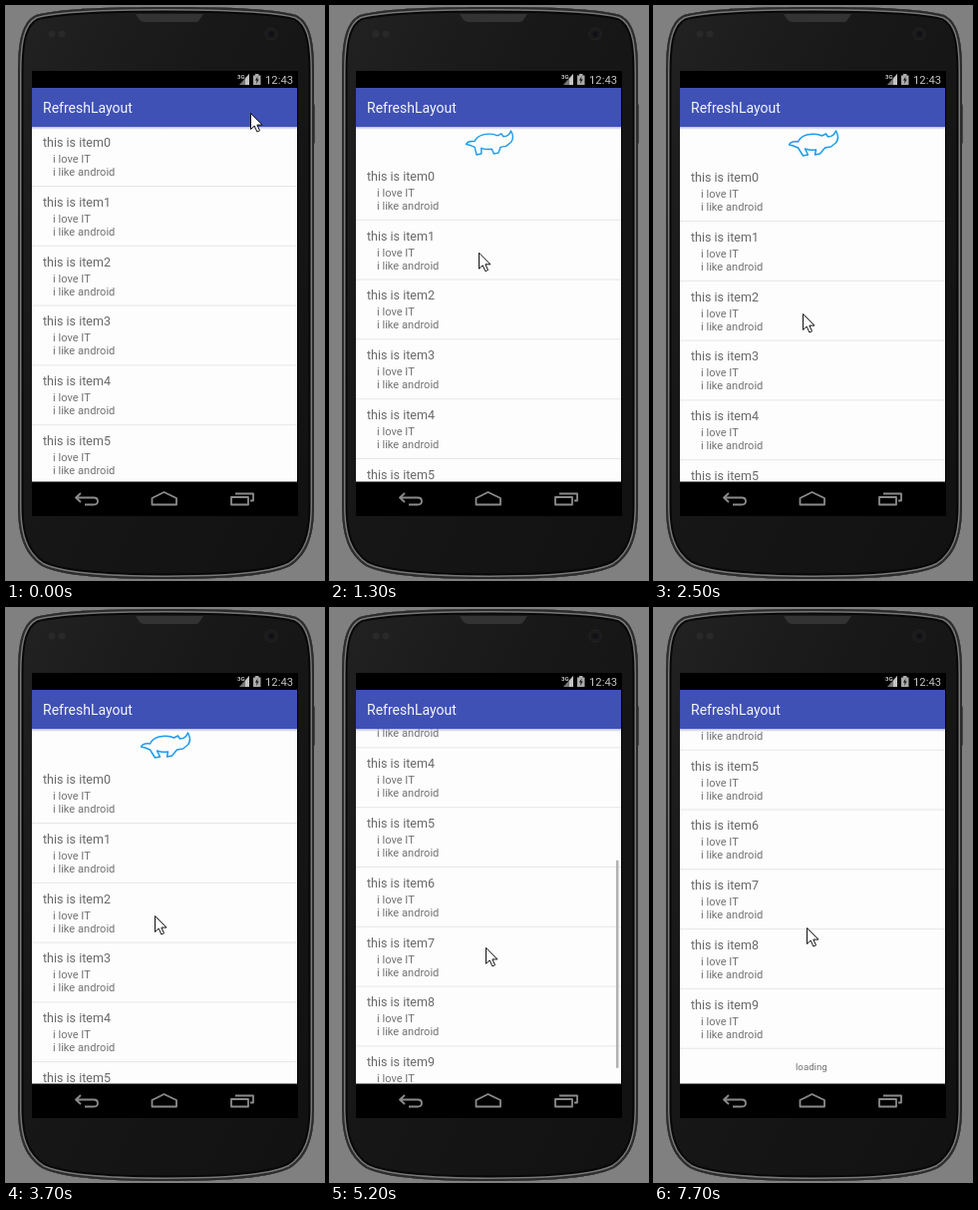
An HTML page that plays this animation: 319x575 px, repeating every 8 s.

```html
<!DOCTYPE html>
<html lang="en">
<head>
<meta charset="utf-8">
<title>RefreshLayout</title>
<style>
  html, body { margin: 0; width: 100%; height: 100%; overflow: hidden; background: #808080; }
  svg { display: block; width: 100vw; height: 100vh; font-family: Roboto, sans-serif; }
</style>
</head>
<body>
<svg viewBox="0 0 319 575">
  <defs>
    <linearGradient id="shell" x2="1" y2="1">
      <stop offset="0" stop-color="#222"/>
      <stop offset=".35" stop-color="#181818"/>
      <stop offset="1" stop-color="#111"/>
    </linearGradient>
    <linearGradient id="shade" x2="0" y2="1">
      <stop offset="0" stop-color="#7986cb" stop-opacity=".6"/>
      <stop offset="1" stop-color="#9fa8da" stop-opacity="0"/>
    </linearGradient>
    <path id="body" d="M12 66C12 34 16 16 30 9C56 2 108 1 160.500 1S265 2 291 9C305 16 309 34 309 66V500C309 530 303 549 285 561C263 572 211 574 160.500 574S58 572 36 561C18 549 12 530 12 500Z"/>
    <clipPath id="inside"><use href="#body"/></clipPath>
    <clipPath id="view"><rect x="26" y="121" width="266" height="355.500"/></clipPath>
  </defs>

  <rect width="319" height="575" fill="#808080"/>
  <rect x="306" y="98" width="4" height="40" rx="1.500" fill="#444"/>
  <g clip-path="url(#inside)">
    <use href="#body" fill="url(#shell)" stroke="#070707" stroke-width="11"/>
    <use href="#body" fill="none" stroke="#777" stroke-width="7"/>
    <use href="#body" fill="none" stroke="#2b2b2b" stroke-width="4"/>
  </g>
  <path d="M130 8H198L194 14Q193 16 190 16H139Q136 16 134 14Z" fill="#333"/>
  <circle cx="266" cy="28" r="6" fill="#1a1a1a" stroke="#252525"/>
  <circle cx="266" cy="28" r="2.500" fill="#101018"/>
  <g fill="#292929"><circle cx="46" cy="28" r="3.500"/><circle cx="56" cy="28" r="3.500"/></g>

  <rect x="26" y="65" width="267" height="446" fill="#000"/>
  <g fill="#c4c4c4">
    <text x="232" y="73" font-size="6" font-weight="700">3G</text>
    <path d="M234 79L244 68V79Z" fill="#777"/><path d="M240 79V72.500L244 68V79Z"/>
    <path d="M248 69.500H250V68H253.500V69.500H255.500V79H248Z" fill="#aaa"/>
    <path d="M252.500 70.500L250 74.500H251.700L251 78L253.700 73.500H252Z" fill="#111"/>
    <text x="260" y="77.500" font-size="11.300">12:43</text>
  </g>

  <rect x="26" y="121" width="266" height="355.500" fill="#fdfdfd"/>
  <g clip-path="url(#view)">
    <g id="list"></g>
    <path id="rhino" fill="none" stroke="#1d9bee" stroke-width="1.500" stroke-linejoin="round"/>
    <rect id="bar" x="287" width="2.500" height="208" fill="#b2b2b5"/>
    <rect x="26" y="121" width="266" height="3" fill="url(#shade)"/>
  </g>
  <rect x="26" y="82" width="266" height="39" fill="#3f51b5"/>
  <text x="37" y="107" font-size="14" fill="#f4f5fb">RefreshLayout</text>

  <g fill="none" stroke="#8b8b8b" stroke-width="1.800" stroke-linejoin="round">
    <path d="M75 488L70 492.500L75 497M70 492.500H88Q92 492.500 92 496T88 499.500H79"/>
    <path d="M146.500 493L158.500 487L171 493V499.500H146.500Z"/>
    <path d="M226 492H243V499.500H226ZM230 488.500H248V495.500H245"/>
  </g>
  <path id="cursor" d="M0 0V16L3.700 12.600L6.400 18.500L9 17.300L6.400 11.600H11.500Z" fill="#fff" stroke="#111"/>
</svg>
<script>
const LOOP = 8000, STEP = 100;
const TOP = 121, ROW = 59.8, COUNT = 10, VIEW = 355.5, HEADER = 35;
const END = COUNT * ROW - VIEW;
const $ = id => document.getElementById(id);

const ramp = (t, from, to) => Math.max(0, Math.min(1, (t - from) / (to - from)));
const easeOut = p => 1 - (1 - p) ** 2;

const label = (x, y, size, text, fill = '#727272') =>
  `<text x="${x}" y="${y}" font-size="${size}" fill="${fill}">${text}</text>`;

function row(i) {
  const y = TOP + i * ROW;
  return label(37, y + 20, 12.5, 'this is item' + i, '#696969') +
    label(47, y + 36, 11.1, 'i love IT') +
    label(47, y + 49, 11.1, 'i like android') +
    `<rect x="26" y="${y + ROW - 0.8}" width="266" height="1" fill="#e6e6e6"/>`;
}

$('list').innerHTML = Array.from({ length: COUNT }, (_, i) => row(i)).join('') +
  label(142, TOP + COUNT * ROW + 21, 9.7, 'loading');

// Stride runs from -1 to 1 and swings the legs.
function rhinoPath(stride) {
  const s = stride * 3;
  return `M-24-17Q-22-21-15-20Q-13-25-6-27Q3-29 9-26L13-28L15-25Q21-25 23-31Q27-24 23-19L18-15L12-14` +
    `L${10 - s}-8L${5 - s}-7L3-12Q-3-11-8-13L${-8 + s}-7L${-13 + s}-6L-15-14L-20-16Z`;
}

function pointer(t, drag) {
  const x = 245.5 - 96 * ramp(t, 0, 540) + 7 * ramp(t, 3800, 4900)
    - 6 * ramp(t, 5200, 6500) + 3 * ramp(t, 6500, 7700);
  const y = 107 + 35 * ramp(t, 0, 540) + drag + 92 * ramp(t, 3800, 4350)
    - 150 * ramp(t, 4350, 4900) + 120 * ramp(t, 4900, 5050)
    - 161 * ramp(t, 5050, 5850) + 172 * ramp(t, 5850, 6500) - 61 * ramp(t, 6500, 7400);
  return `translate(${x} ${y + 0.5})`;
}

function draw(t) {
  // The pull resists more the further it is dragged, then rests at the header height.
  const drag = 166 * ramp(t, 540, 1745);
  const stretch = 2.35 * drag ** 0.573;
  const held = stretch + (HEADER - stretch) * easeOut(ramp(t, 2000, 2400));
  const pull = held * (1 - easeOut(ramp(t, 3800, 4200)));
  const scroll = END * easeOut(ramp(t, 4400, 5550)) + HEADER * ramp(t, 6500, 7400);

  $('cursor').setAttribute('transform', pointer(t, drag));
  $('list').setAttribute('transform', `translate(0 ${pull - scroll})`);

  const stride = t < 2100 ? 0 : Math.sin(Math.floor((t + 50) / 150) * Math.PI / 2);
  const size = ramp(pull, 5.5, HEADER);
  $('rhino').setAttribute('d', rhinoPath(stride));
  $('rhino').setAttribute('transform', `translate(159.5 ${TOP + pull}) scale(${size})`);
  $('rhino').style.opacity = size > 0 ? 1 : 0;

  $('bar').setAttribute('y', TOP + 1 + scroll * VIEW / (ROW * COUNT));
  $('bar').style.opacity = ramp(t, 4400, 4500) * (1 - ramp(t, 5700, 6000));
}

function tick(now) {
  draw(Math.floor(now % LOOP / STEP) * STEP);
  requestAnimationFrame(tick);
}
draw(0);
requestAnimationFrame(tick);
</script>
</body>
</html>
```
